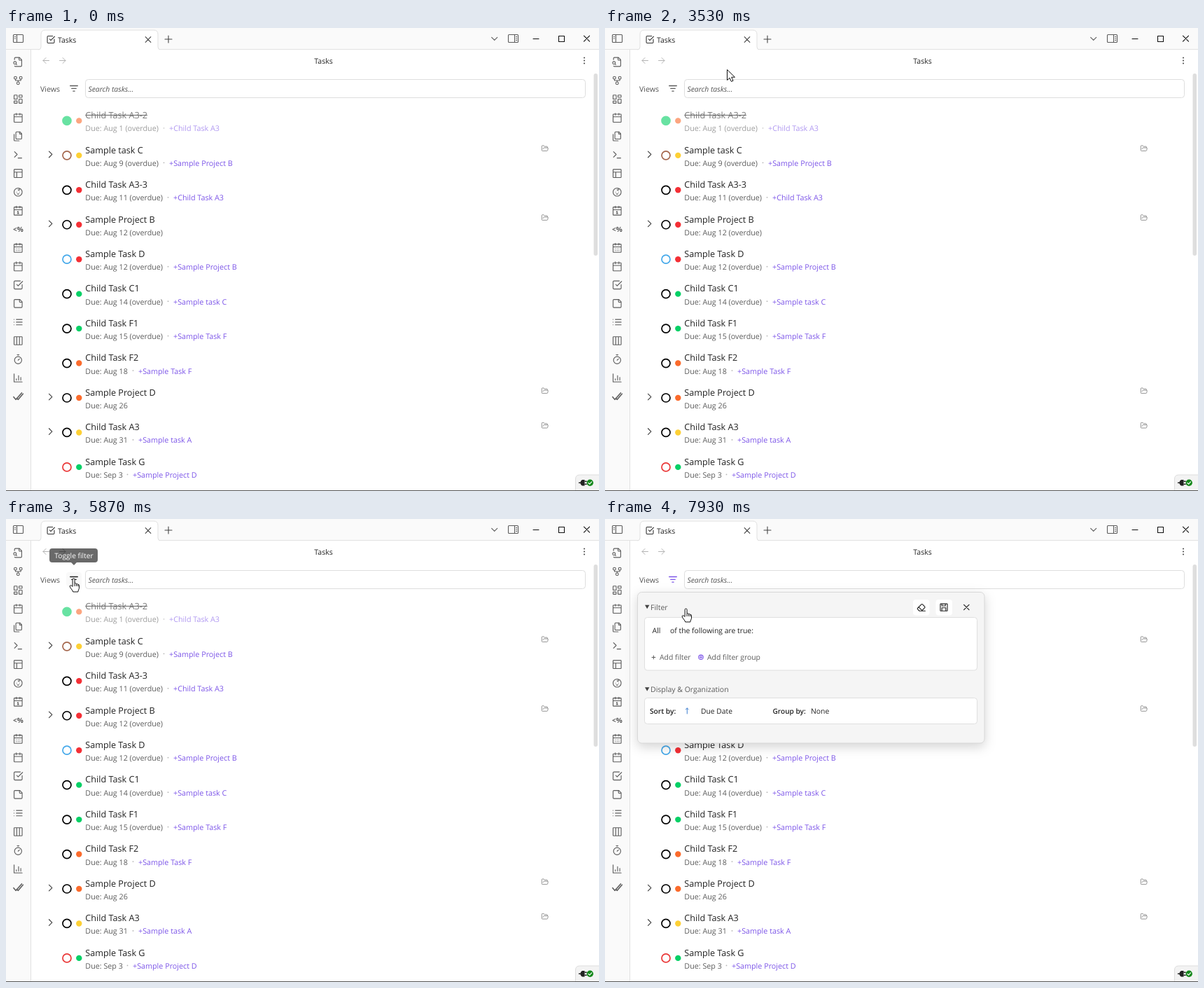
An HTML page for the animation above (8000 ms loop, 847x661 px).

```html
<!DOCTYPE html>
<html lang="en">
<head>
<meta charset="utf-8">
<title>Tasks</title>
<style>
html, body { margin: 0; height: 100%; overflow: hidden; background: #fff; }
svg { display: block; width: 100vw; height: 100vh; font-family: "Open Sans", sans-serif; text-rendering: geometricPrecision; }
#panel { filter: drop-shadow(0 5px 8px rgba(0,0,0,.17)); }
</style>
</head>
<body>
<svg id="stage" viewBox="0 0 847 661"></svg>
<script>
const GREY = '#5c5c5c', INK = '#222', PURPLE = '#7c55e8';
const RED = '#f42f35', ORANGE = '#fb6b2c', YELLOW = '#fdd035', GREEN = '#05d066';

// Markup helpers
const text = (x, y, s, size = 10.5, fill = INK, more = '') =>
  `<text x="${x}" y="${y}" font-size="${size}" fill="${fill}" ${more}>${s}</text>`;
const rect = (x, y, w, h, r, fill, stroke = 'none') =>
  `<rect x="${x}" y="${y}" width="${w}" height="${h}" rx="${r}" fill="${fill}" stroke="${stroke}"/>`;
const line = (d, stroke = GREY, w = 1.1, more = '') =>
  `<path d="${d}" fill="none" stroke="${stroke}" stroke-width="${w}" stroke-linecap="round" stroke-linejoin="round" ${more}/>`;
const disc = (x, y, r, fill, stroke = 'none', w = 1) =>
  `<circle cx="${x}" cy="${y}" r="${r}" fill="${fill}" stroke="${stroke}" stroke-width="${w}"/>`;
// Icons are drawn on a 24 unit grid
const icon = (d, x, y, scale = .64, stroke = GREY, w = 1.75) =>
  line(d, stroke, w, `transform="translate(${x} ${y}) scale(${scale}) translate(-12 -12)"`);
const ring = (x, y, r) => `M${x - r} ${y}a${r} ${r} 0 1 0 ${2 * r} 0a${r} ${r} 0 1 0 ${-2 * r} 0`;
const box = (x, y, w, h) =>
  `M${x + 1} ${y}h${w - 2}q1 0 1 1v${h - 2}q0 1-1 1h${2 - w}q-1 0-1-1v${2 - h}q0-1 1-1`;

const calendar = box(3, 4, 18, 18) + 'M8 2v4M16 2v4M3 10h18';
const checkBox = 'M21 11v8a2 2 0 0 1-2 2H5a2 2 0 0 1-2-2V5a2 2 0 0 1 2-2h12M9 11l3 3L22 4';
const ribbon = [
  'M14 2v4a2 2 0 0 0 2 2h4M4.3 21a2 2 0 0 0 1.7 1h12a2 2 0 0 0 2-2V7l-5-5H6a2 2 0 0 0-2 2v3M9 18l-1.5-1.5' + ring(5, 14, 3),
  ring(12, 18, 3) + ring(6, 6, 3) + ring(18, 6, 3) + 'M18 9v2q0 1-1 1H7q-1 0-1-1V9M12 12v3',
  box(3, 3, 7, 9) + box(14, 3, 7, 5) + box(14, 12, 7, 9) + box(3, 16, 7, 5),
  calendar,
  'M20 7h-3a2 2 0 0 1-2-2V2M9 18a2 2 0 0 1-2-2V4a2 2 0 0 1 2-2h7l4 4v10a2 2 0 0 1-2 2ZM3 7.6v12.8A1.6 1.6 0 0 0 4.6 22h9.8',
  'M4 17l6-6-6-6M12 19h8',
  box(3, 3, 18, 18) + 'M3 9h18M9 21V9',
  ring(12, 12, 9) + 'M9 12h.01M15 12h.01M10 16q2 1 4 0M12 3q4 1 3 4-1 2-3 0',
  calendar + 'M10.5 14.5l1.5-1v5M10.5 18.5h3',
  '',
  calendar + 'M8 14h.01M12 14h.01M16 14h.01M8 18h.01M12 18h.01M16 18h.01',
  calendar,
  checkBox,
  'M16 3H5a2 2 0 0 0-2 2v14a2 2 0 0 0 2 2h14a2 2 0 0 0 2-2V8ZM15 3v4a2 2 0 0 0 2 2h4',
  'M8 6h13M8 12h13M8 18h13M3 6h.01M3 12h.01M3 18h.01',
  box(3, 3, 18, 18) + 'M9 3v18M15 3v18',
  'M10 2h4M12 14l3-3' + ring(12, 14, 8),
  'M3 3v18h18M8 17v-3M13 17V7M18 17v-6',
  'M2 13l5 6L20 4M9 16l3 3L23 6'
];
const folder = 'M6 14l1.5-2.9A2 2 0 0 1 9.2 10H20a2 2 0 0 1 1.9 2.5l-1.5 6a2 2 0 0 1-2 1.5H4a2 2 0 0 1-2-2V5a2 2 0 0 1 2-2h4l3 3h7a2 2 0 0 1 2 2v2';

function frameUi() {
  const arrow = 'M-4 0h8.5M0-4l-4 4 4 4';
  return rect(0, 0, 847, 30, 0, '#fafafa') + rect(0, 30, 36, 631, 0, '#fafafa')
    + line('M0 30.5H847M35.5 31V661', '#e2e2e2', 1)
    + '<path d="M46 31q4 0 4-4V9q0-6 6-6H211q6 0 6 6V27q0 4 4 4" fill="#fff" stroke="#e0e0e0"/>'
    + rect(47, 31, 174, 2, 0, '#fff')
    + line(box(10.5, 9.5, 14, 11) + 'M15.5 9.5v11M12.4 12.5h1.2M12.4 15h1.2')
    + icon(checkBox, 64, 16.5, .55, '#333', 2)
    + text(74, 20.5, 'Tasks')
    + line('M199.2 12.7l7.6 7.6M206.8 12.7l-7.6 7.6M227 16h10M232 11v10', '#444')
    + line('M693.7 13.3l4 4 4-4')
    + line(box(717.5, 9.5, 14, 11) + 'M726.5 9.5v11M728.5 12.5h1.2M728.5 15h1.2M728.5 17.5h1.2')
    + line('M753 15.5h8M789.5 11.5h8v8h-8zM825.5 11.2l8 8M833.5 11.2l-8 8', '#111')
    + line(arrow, '#b4b4b4', 1, 'transform="translate(57 46.5)"')
    + line(arrow, '#b4b4b4', 1, 'transform="translate(81 46.5) scale(-1 1)"')
    + text(453.5, 50.5, 'Tasks', 10.5, INK, 'text-anchor="middle"')
    + [42.5, 46.5, 50.5].map(y => disc(826, y, 1.1, '#555')).join('')
    + ribbon.map((d, i) => icon(d, 17.3, 48.5 + 26.53 * i, .64, GREY, i == 18 ? 2.4 : 1.75)).join('')
    + text(17.3, 291, '&lt;%', 10, GREY, 'font-weight="700" text-anchor="middle"')
    + text(49, 90.5, 'Views', 10.6, '#555', 'font-weight="500"')
    + rect(113.5, 73.5, 714, 26, 4, '#fff', '#dedede')
    + text(117.5, 90.5, 'Search tasks...', 10.4, '#555', 'font-style="italic"')
    + rect(839.5, 65, 5.5, 260, 2.7, '#dedede');
}

// title, due date, link, link x, status colour, priority colour, expandable
const tasks = [
  ['Child Task A3-2', 'Aug 1 (overdue)', 'Child Task A3', 233, GREEN, ORANGE],
  ['Sample task C', 'Aug 9 (overdue)', 'Sample Project B', 233, '#a5674d', YELLOW, 1],
  ['Child Task A3-3', 'Aug 11 (overdue)', 'Child Task A3', 239, '#000', RED],
  ['Sample Project B', 'Aug 12 (overdue)', '', 0, '#000', RED, 1],
  ['Sample Task D', 'Aug 12 (overdue)', 'Sample Project B', 239, '#45a9ea', RED],
  ['Child Task C1', 'Aug 14 (overdue)', 'Sample task C', 239, '#000', GREEN],
  ['Child Task F1', 'Aug 15 (overdue)', 'Sample Task F', 239, '#000', GREEN],
  ['Child Task F2', 'Aug 18', 'Sample Task F', 189, '#000', ORANGE],
  ['Sample Project D', 'Aug 26', '', 0, '#000', ORANGE, 1],
  ['Child Task A3', 'Aug 31', 'Sample task A', 189, '#000', YELLOW, 1],
  ['Sample Task G', 'Sep 3', 'Sample Project D', 181, '#ea3838', GREEN]
];

function taskRow([title, due, link, linkX, status, priority, expandable], i) {
  const y = 132.4 + 49.45 * i, done = i == 0;
  let s = disc(87, y, 6, done ? status : '#fff', status, 1.7) + disc(104.3, y, 4.2, priority)
    + text(113.3, y - 3.2, title, 12.65, INK, done ? 'text-decoration="line-through"' : '')
    + text(113.3, y + 15, 'Due: ' + due, 10.75, GREY);
  if (link) s += disc(linkX - 7.5, y + 10.5, .9, '#b5b5b5') + text(linkX, y + 15, '+' + link, 10.75, PURPLE);
  if (expandable) s += line(`M61.5 ${y - 5.7}l4.3 4.3-4.3 4.3`, '#444', 1.2) + icon(folder, 769.8, y - 10, .45, '#8a8a8a', 2);
  return `<g opacity="${done ? .6 : 1}">${s}</g>`;
}

function statusBar() {
  return '<path d="M813.5 660V644q0-6 6-6H848V660" fill="#f3f3f3" stroke="#ddd"/>'
    + '<path d="M823 645h3.5v8.500h-3.500q-2-1-2.500-3.300v-2q.5-2.200 2.500-3.200z" fill="#222"/>'
    + line('M818.500 649.300h2M827 647.300h2.200M827 651.300h2.200', INK, 1.4)
    + disc(834.2, 649.3, 4.7, '#15891c') + line('M832 649.500l1.600 1.600 2.900-3.200', '#fff', 1.2)
    + rect(0, 660, 847, 1, 0, '#555');
}

function panel() {
  const bold = 'font-weight="600"', mid = 'font-weight="500"', edge = '#dfdfdf';
  const fold = y => `<path d="M57 ${y}h6.400l-3.200 5.500z" fill="#444"/>`;
  return rect(46.5, 104.500, 495.500, 215.500, 6, '#f5f5f5', '#d8d8d8')
    + fold(122.7) + text(65, 129.5, 'Filter', 10.5, GREY, mid)
    + rect(440, 115, 23.500, 22.500, 4, '#fff') + rect(472.500, 115, 23.500, 22.500, 4, '#fff')
    + icon('M7 21l-4.300-4.300a2 2 0 0 1 0-2.800l9.600-9.600a2 2 0 0 1 2.800 0l5.600 5.600a2 2 0 0 1 0 2.800L13 21M22 21H7M5 11l9 9', 451.8, 126.200, .56, INK, 2)
    + icon(box(3, 3, 18, 18) + 'M7 3v5h9V3M7 21v-8h10v8', 484, 126.200, .56, INK, 2)
    + line('M512.600 122.300l7.400 7.400M520 122.300l-7.400 7.400', INK, 1.2)
    + rect(56.500, 140.500, 475, 75.500, 4, '#fff', edge)
    + text(67.5, 162.700, 'All') + text(93, 162.700, 'of the following are true:', 10.4)
    + line('M67 197.500h4.800M69.400 195.100v4.800', GREY, 1) + text(78, 201, 'Add filter', 10.4, GREY)
    + disc(137, 197.300, 3.200, 'none', PURPLE, 1.1) + line('M135 197.300h4M137 195.300v4', PURPLE, 1)
    + text(146, 201, 'Add filter group', 10.4, GREY)
    + fold(240.200) + text(65, 247, 'Display &amp; Organization', 10.5, GREY, mid)
    + rect(56.500, 255.500, 475, 37, 4, '#fff', edge)
    + text(64, 277.700, 'Sort by:', 10.2, INK, bold)
    + line('M117.300 278v-8M115.300 272l2-2 2 2', '#3f7fd0', 1)
    + text(137, 277.700, 'Due Date', 10.3)
    + text(239.500, 277.700, 'Group by:', 10.1, INK, bold) + text(294, 277.700, 'None', 10.4);
}

const tooltip = '<path d="M66 42H127q4 0 4 4V58q0 4-4 4H101l-4 4-4-4H66q-4 0-4-4V46q0-4 4-4z" fill="#000" fill-opacity=".9"/>'
  + text(97, 55.700, 'Toggle filter', 10.2, '#fff', 'text-anchor="middle" font-weight="500"');

const pointers = {
  resize: 'M-7.500-7.500H-1.500L-3.600-5.400 5.400 3.600 7.500 1.500V7.500H1.500L3.600 5.400-5.400-3.600-7.500-1.500Z',
  arrow: 'M0 0V15l3.500-3.300 2.400 5.200 2.600-1.100-2.300-5.100H11Z',
  hand: 'M-1.600 11.500V1.500a1.500 1.500 0 0 1 3 0V7.500a1.400 1.300 0 0 1 2.600 .4 1.300 1.200 0 0 1 2.200 .7 1.200 1.200 0 0 1 1.600 1V13C7.800 16 6.300 16 6.200 19H-1C-1.300 16.500-5.500 13.500-5.500 11-5.500 9.300-3.500 9.300-1.600 11.500ZM1.400 7.500V11M4 8V11M6.200 9V11.200'
};

const stage = document.getElementById('stage');
stage.innerHTML = frameUi() + tasks.map(taskRow).join('') + statusBar()
  + `<g id="filter">${rect(86, 76, 22, 20, 4, '#f9f9f9')}${line('M91.700 82.500h10.600M93.700 86.300h6.600M95.800 90.100h2.400', GREY, 1.3)}</g>`
  + `<g id="panel">${panel()}</g><g id="tip">${tooltip}</g>`
  + '<path id="pointer" fill="#fff" stroke="#111" stroke-linejoin="round"/>';
const [filter, popup, tip, pointer] = ['filter', 'panel', 'tip', 'pointer'].map(id => document.getElementById(id));
const [hover, bars] = filter.children;

// Pointer path: tick, x, y
const FPS = 15, LOOP = 8000;
const track = [
  [18, 17, 37], [23, 95, 191], [24, 95, 191], [25, 82, 155], [28, 105, 100], [31, 165, 60], [33, 178.5, 55],
  [36, 178.5, 55], [37, 178, 53], [40, 178, 53], [42, 174.5, 66], [49, 174.5, 66], [53, 174.5, 59.5],
  [56, 174.5, 59.5], [60, 152, 46], [65, 114, 48], [69, 100.5, 61.5], [70, 99.500, 62.5], [72, 99.500, 62.5],
  [75, 97.5, 75], [79, 96.7, 85], [104, 96.7, 85], [105, 98, 85], [107, 98, 85], [108, 96.7, 85],
  [113, 96.7, 85], [118, 118.5, 130], [119, 115.700, 128]
];

function pointerAt(n) {
  const i = track.findIndex(k => k[0] > n);
  if (i < 0) return track[track.length - 1].slice(1);
  const [a, x, y] = track[i - 1], [b, u, v] = track[i], f = (n - a) / (b - a);
  return [x + (u - x) * f, y + (v - y) * f];
}

function draw(now) {
  const n = Math.floor((now % LOOP + 4) * FPS / 1000) % (LOOP * FPS / 1000);
  const over = n >= 77 && n < 114;
  hover.setAttribute('opacity', over ? 1 : 0);
  bars.setAttribute('stroke', over ? INK : n >= 114 ? PURPLE : GREY);
  tip.setAttribute('opacity', n < 88 || n >= 95 ? 0 : Math.min(1, .65 + (n - 88) * .12));
  popup.setAttribute('opacity', n < 95 ? 0 : n == 95 ? .5 : 1);
  pointer.setAttribute('opacity', n < 18 ? 0 : 1);
  if (n >= 18) {
    pointer.setAttribute('d', pointers[n < 37 ? 'resize' : n < 77 ? 'arrow' : 'hand']);
    pointer.setAttribute('transform', `translate(${pointerAt(n)})`);
  }
  requestAnimationFrame(draw);
}
requestAnimationFrame(draw);
</script>
</body>
</html>
```
